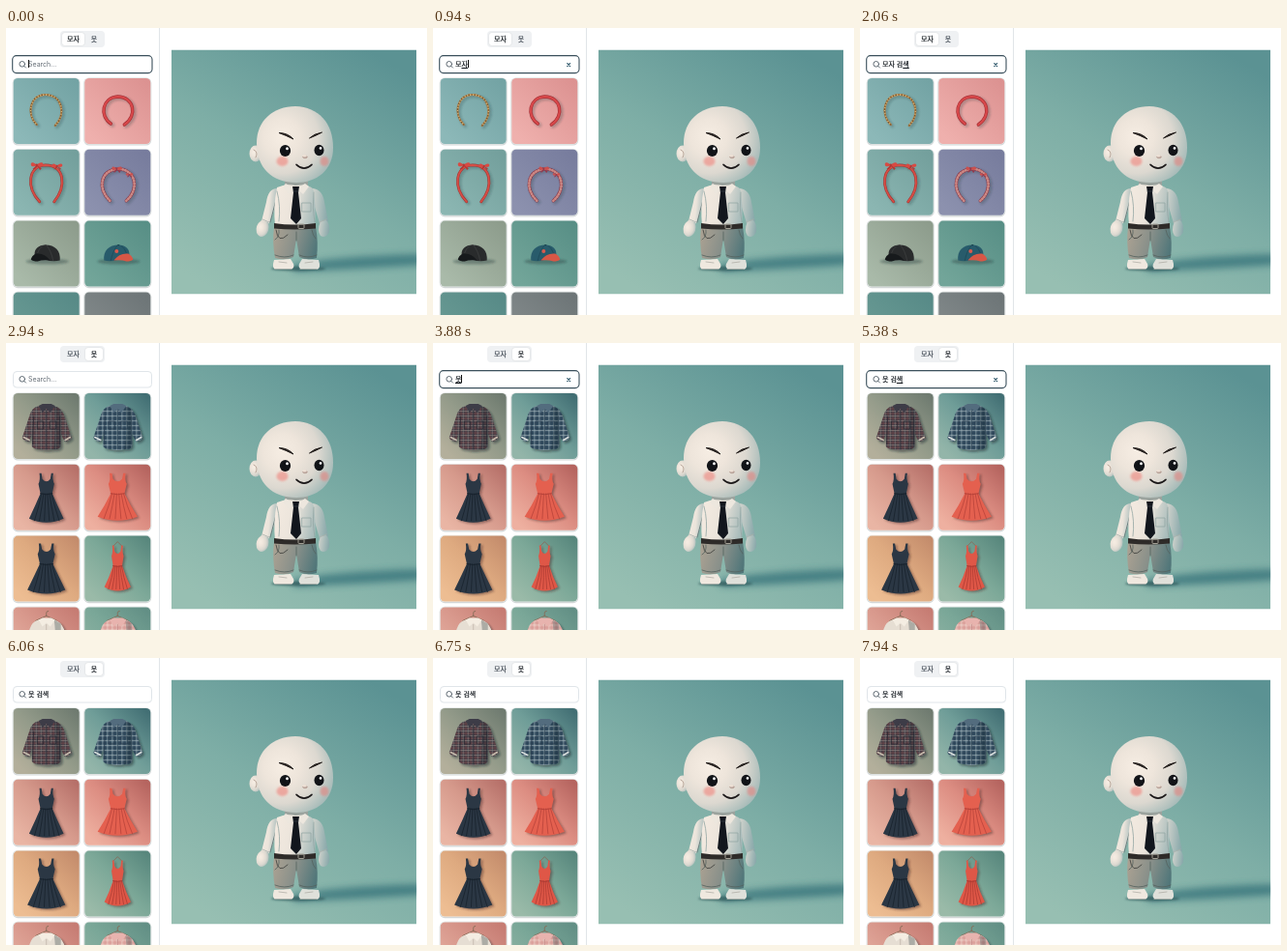
Write an HTML page that moves like this. It is 435x297 px and loops after 8000 ms.

```html
<!DOCTYPE html>
<html lang="ko">
<head>
<meta charset="utf-8">
<title>Wardrobe search</title>
<style>
html, body { margin: 0; width: 100%; height: 100%; overflow: hidden; background: #fff; }
body { position: relative; font: 500 7px/10px "Noto Sans CJK KR", "Noto Sans CJK JP", sans-serif; color: #0c1218; -webkit-text-stroke: .18px; }
svg { position: absolute; left: 0; top: 0; display: block; }
.tabs { position: absolute; left: 56px; top: 3px; width: 46px; height: 17px; border-radius: 4px; background: #eff1f3; }
.tab { position: absolute; top: 2px; height: 13px; line-height: 13px; text-align: center; border-radius: 3px; color: #3d4650; }
.tab.on { background: #fff; color: #0c1218; box-shadow: 0 0 2px #0002; }
#hatTab { left: 2px; width: 23px; }
#topTab { left: 26px; width: 18px; }
.text { position: absolute; left: 23px; top: 32.3px; white-space: pre; }
.text u { text-underline-offset: 1px; text-decoration-thickness: .7px; }
#caret { display: inline-block; position: relative; width: 0; height: 7px; vertical-align: -1px; }
#caret::after { content: ""; position: absolute; left: 0; top: -1px; width: .8px; height: 8px; background: #111; }
#hint { font: 400 7px/10px Inter, sans-serif; color: #646c75; -webkit-text-stroke: 0; }
</style>
</head>
<body>
<svg id="art" width="435" height="297" viewBox="0 0 435 297"></svg>
<div class="tabs"><div class="tab" id="hatTab">모자</div><div class="tab" id="topTab">옷</div></div>
<svg width="158" height="50" fill="none" stroke-linecap="round">
  <rect id="idle" x="7.5" y="29.5" width="143" height="16.5" rx="3.5" stroke="#e0e5e9"/>
  <rect id="active" x="6.7" y="28.6" width="144.3" height="18" rx="4" stroke="#3a4f5b" stroke-width="1.1"/>
  <g stroke="#4c5863" stroke-width=".9"><circle cx="16.7" cy="37.3" r="2.8"/><path d="M18.8 39.4l1.7 1.7"/></g>
  <path id="clear" d="M138.8 36.7l2.8 2.8m0-2.8l-2.8 2.8" stroke="#285266" stroke-width="1.2"/>
</svg>
<div class="text"><span id="done"></span><u id="composing"></u><span id="caret"></span><span id="hint">Search...</span></div>
<script>
const $ = id => document.getElementById(id);

const path = (d, fill, extra = '') => `<path d="${d}" fill="${fill}" ${extra}/>`;
const line = (d, color, w = 1, extra = '') =>
  `<path d="${d}" fill="none" stroke="${color}" stroke-width="${w}" stroke-linecap="round" stroke-linejoin="round" ${extra}/>`;
const oval = (x, y, rx, ry, fill, extra = '') => `<ellipse cx="${x}" cy="${y}" rx="${rx}" ry="${ry}" fill="${fill}" ${extra}/>`;
const soft = 'filter="url(#blur)"';

// Light falls from the lower left, so colours run from lit to shaded
const LIT = 'x1=".1" y1=".9" x2=".95" y2=".05"';
const ACROSS = 'x1="0" y1=".3" x2="1" y2=".5"';
const stops = colors => colors.map((c, i) => `<stop offset="${i / (colors.length - 1)}" stop-color="${c}"/>`).join('');
const linear = (id, colors, way = LIT) => `<linearGradient id="${id}" ${way}>${stops(colors)}</linearGradient>`;
const radial = (id, colors) => `<radialGradient id="${id}" cx=".33" cy=".4" r=".72">${stops(colors)}</radialGradient>`;

function plaid(id, base, a, b) {
  return `<pattern id="${id}" width="5" height="5" patternUnits="userSpaceOnUse">
    <rect width="5" height="5" fill="${base}"/>
    <path d="M1.2 0v5M0 1.2h5" stroke="${a}" stroke-width="1.2" opacity=".7"/>
    <path d="M3.6 0v5M0 3.6h5" stroke="${b}" stroke-width=".6" opacity=".75"/></pattern>`;
}

// Garments and hats, drawn in a 68 px tile
const band = (d, color, shade, w, braid) =>
  line(d, '#24384044', w + 1, `transform="translate(1.8 1.5)" ${soft}`) + line(d, shade, w) + line(d, color, w * .6) +
  (braid ? line(d, braid, w * .7, 'stroke-dasharray=".3 2.6"') : '');

function bow(x, y, size, color, dark) {
  return `<g transform="translate(${x} ${y}) scale(${size})">` +
    path('M0 0C-3-4-7-4-7-1S-4 3 0 0C3-4 8-4 8-1S4 3 0 0', color) +
    path('M0 0L-5 5-2 5 1 1 4 6 6 4Z', dark) + oval(0, 0, 1.4, 1.5, dark) + '</g>';
}

function cap(crown, brim, shade, badge) {
  const flip = badge ? 'transform="translate(68 0) scale(-1 1)"' : '';
  return oval(35, 42, 22, 3, '#263d3c66', soft) + `<g ${flip}>` +
    path('M22 36C21 29 26 25 33 25C43 25 49 31 48 41Q39 43 30 39Z', crown) +
    path('M23 34Q32 33 38 41Q30 40 25 42Q20 42 18 40Q19 36 23 34Z', brim) +
    line('M34 25Q39 31 41 41M30 26Q26 29 25 33', shade, .5) + oval(33, 25, 1.2, .6, shade) + '</g>' +
    (badge ? oval(33, 31.5, 2, 2, badge) : '');
}

function shirt(fill, collar, seam, cuff) {
  const body = 'M26 13Q34 17 42 13L49 17 49 55Q46 59 41 58Q34 60 27 58Q21 58 19 55L20 17Z';
  const arms = 'M26 13Q19 15 17 22Q13 34 9 46Q11 50 16 50Q20 42 22 32ZM42 13Q49 15 52 22Q56 34 60 46Q57 50 53 50Q48 42 47 32Z';
  return path(body + arms, '#1c282a77', `transform="translate(2 2)" ${soft}`) +
    path(arms, fill) + path(body, fill) + path('M42 13L49 17 49 55Q46 59 41 58Q45 35 42 13Z', '#10202a44') +
    line('M21 24Q20 40 20 53M48 24V53M34 18V58M25 29h6v8h-6zM38 29h6v8h-6z', seam, .7) +
    line('M10.5 45.5l6 3M58.5 45.5l-5 3', cuff, 1.6) +
    path('M26 13L30 11H39L43 13 38 20 34 16 30 20Z', collar);
}

function dress(color, fold, w, top, hem) {
  const c = 34, x = d => c + d * w, waist = top + 21;
  const d = `M${x(-7)} ${top}L${x(-5)} ${top} ${x(-4)} ${top + 6}Q${c} ${top + 11} ${x(4)} ${top + 6}L${x(5)} ${top} ${x(7)} ${top}` +
    `Q${x(6)} ${top + 7} ${x(8)} ${top + 11}L${x(6)} ${waist}Q${x(11)} ${waist + 12} ${x(17.5)} ${hem - 4}` +
    `Q${c} ${hem + 4} ${x(-17.5)} ${hem - 4}Q${x(-11)} ${waist + 12} ${x(-6)} ${waist}L${x(-8)} ${top + 11}Q${x(-6)} ${top + 7} ${x(-7)} ${top}Z`;
  const folds = [-12, -7, -2, 3, 8, 13].map(k => `M${x(k * .4)} ${waist}Q${x(k * .6)} ${waist + 12} ${x(k)} ${hem - 2}`).join('');
  return path(d, '#4b302b77', `transform="translate(2 1.5)" ${soft}`) + path(d, color) +
    line(folds, fold, .8) + line(`M${x(-6)} ${waist}Q${c} ${waist + 2} ${x(6)} ${waist}`, fold, 1);
}

const hanger = line('M34 9V6q0-2 2-2M34 9L23 14M34 9L45 14', '#866c58', .9);
const hung = (fill, collar, seam) => hanger + shirt(fill, collar, seam, collar);

const hats = [
  [['#8cb8b8', '#73a3a4'], band('M24 48C13 37 17 17 33 17C50 17 55 37 43 49', '#d8b478', '#a17945', 2.2, '#79562f')],
  [['#efb0ad', '#dc9291'], band('M27 47C15 39 18 20 34 19C51 19 55 39 41 48', '#d9494b', '#a92f35', 3.4)],
  [['#8bb6b2', '#739f9c'], band('M27 54C13 39 15 17 33 16C53 16 55 38 42 54', '#d74f46', '#a43432', 2.8) +
    bow(24, 16, .85, '#d84a43', '#b53532') + bow(45, 17, .7, '#d84a43', '#b53532')],
  [['#8c91ae', '#777c9d'], band('M26 53C13 40 16 22 34 20C53 20 57 41 43 53', '#c76968', '#843e52', 3.4, '#c98c88') +
    bow(33, 20, .7, '#ca504e', '#96374a') + bow(46, 26, .5, '#ca504e', '#96374a')],
  [['#a9baa9', '#8d9c8c'], cap('#292b2c', '#171a1c', '#4a4c4c')],
  [['#72a599', '#588f86'], cap('#285b6b', '#d75746', '#173f4b', '#d95a4d')],
  [['#6b9c95', '#578a87'], ''],
  [['#868d8e', '#6d7577'], '']
];
const tops = [
  [['#b3af9b', '#929a89', '#6f7b70'], shirt('url(#plaidRed)', '#3d3c47', '#23252f', '#c4b9ab')],
  [['#93b5a9', '#6f9d98', '#426f74'], shirt('url(#plaidBlue)', '#536c7e', '#263a4c', '#d5dcda')],
  [['#e9b5a4', '#d69a8c', '#b67069'], dress('#2b3744', '#18222d', 1.02, 9, 60)],
  [['#eeb0a0', '#dc8d82', '#b5645f'], dress('#e4604f', '#b8433a', 1.18, 9, 58)],
  [['#edbd92', '#deaa80', '#c48c6c'], dress('#2b3744', '#18222d', 1.12, 8, 60)],
  [['#9abaa8', '#7ca898', '#58877d'], line('M29 11L34 6 39 11', '#8d5f50', .7) + dress('#df5747', '#ae3b33', .78, 10, 57)],
  [['#e7b4a5', '#d8988c', '#c67c73'], hung('#e6ded3', '#f4ede2', '#bcb1a5')],
  [['#93b5a5', '#7aa798', '#628f85'], hung('url(#plaidPink)', '#e8b3ae', '#bd7b7a')]
];

function grid(id, tiles) {
  return `<g id="${id}">` + tiles.map(([colors, item], i) => {
    const x = i % 2 ? 81.3 : 7.7, y = 52 + (i >> 1) * 73.8, key = id + i;
    return `<g transform="translate(${x} ${y})"><defs>${linear(key, colors)}</defs>
      <rect x="-1" y="-.6" width="70" height="70.2" rx="5.5" fill="#c4cacb" opacity=".75"/>
      <rect x="-.5" y="-.5" width="69" height="69" rx="5" fill="#e9edec"/>
      <rect width="68" height="68" rx="4.5" fill="url(#${key})"/>${item}</g>`;
  }).join('') + '</g>';
}

function figure() {
  const floor = path('M296 245Q340 236 430 234V245Q360 250 298 252Z', '#2f6c75', 'opacity=".7" filter="url(#wide)"') +
    oval(302, 249, 28, 2.5, '#315a5c', `opacity=".75" ${soft}`);
  const arms = path('M280 166Q271 166 269 180L264 200Q267 204 272 202L279 184Z', 'url(#cloth)') +
    path('M317 166Q327 167 329 180L333 200Q329 205 324 202L318 182Z', 'url(#shade)') +
    path('M264 199Q257 204 259 212Q262 218 267 215Q273 211 271 201Z', 'url(#skin)') +
    path('M325 200Q321 210 325 215Q331 218 334 211Q335 203 331 199Z', 'url(#shade)') +
    line('M265 198l7 3M324 201l7-3', '#a9b0ab', .8) + line('M279 178L273 201', '#6b807f', 1);
  const shoe = 'M277 240Q274 249 279 250H293Q299 249 297 244L294 239Z';
  const legs = path(shoe, '#efe8df') + path(shoe, '#dfe0da', 'transform="translate(600 0) scale(-1 1)"') +
    line('M278 249.5H295M304 249.5H321', '#9fa9a4', 1) + line('M282 242l8 1M309 243l8-1', '#aaa79f', .7) +
    path('M277 205H320Q323 223 321 238Q311 241 303 237L300 218 297 237Q288 241 278 238Q275 223 277 205Z', 'url(#pants)') +
    line('M278 235q10 4 19 0M303 235q9 4 18 0M300 211v9M282 209q1 7-4 10M316 209q1 6 4 9', '#55635f', .8) +
    line('M279 209Q281 224 291 214', '#3a3b38', .8);
  const torso = path('M288 154H312V168H288Z', '#9ba39e') +
    path('M280 165Q289 161 299 163Q311 161 317 166Q321 183 319 205H278Q276 184 280 165Z', 'url(#cloth)') +
    line('M306 181h9v9h-9zM280 169q4 15 2 31M318 170q-2 16 1 32', '#93a6a4', .8) +
    path('M289 161L298 166 292 172 286 164ZM309 161L300 166 307 172 313 164Z', '#ede7de') +
    path('M296 164H303L302 170 305 197 300 203 294 197 297 170Z', '#12161d') + line('M297 169h5', '#39414a', .7) +
    path('M277 202Q298 205 320 202V207.5Q298 209.5 277 207.5Z', '#2e2b29') +
    '<rect x="302" y="203" width="6" height="4.5" rx=".7" fill="none" stroke="#a3a095"/>';
  const head = oval(258, 130, 6.5, 8.5, 'url(#skin)') + line('M256 126q5 2 2 8', '#b8a79b', 1) +
    path('M259 119C259 96 276 81 299 81C323 82 338 98 338 124C338 147 321 160 300 160C275 160 259 145 259 119Z', 'url(#skin)') +
    oval(285.5, 138, 6, 5, '#ed9a92', `opacity=".8" ${soft}`) + oval(329, 138, 4.5, 5, '#d9938e', `opacity=".8" ${soft}`) +
    oval(288.5, 127, 5.6, 6, '#111317') + oval(323.5, 126.5, 5, 5.7, '#111317') +
    oval(290.5, 124.8, 1.4, 1.5, '#fff') + oval(325, 124.4, 1.3, 1.4, '#fff') +
    path('M282 108.5Q291 108.5 297 115Q289 111 282 108.5Z', '#241f1d', 'stroke="#241f1d"') +
    path('M313.5 114Q318 109.5 326.5 108Q320 111.5 313.5 114Z', '#241f1d', 'stroke="#241f1d"') +
    oval(309, 133.3, 2.6, 1.9, '#b9a49a') + oval(308.5, 132.3, 2, 1.3, '#eee1d6') +
    line('M300 141.3Q308 149 316 141.3', '#1c191a', 1.6);
  return floor + arms + legs + torso + head;
}

const stage = 'x="171" y="22.5" width="253.2" height="253"';
$('art').innerHTML = `<defs>
  <filter id="blur" x="-30%" y="-50%" width="160%" height="200%"><feGaussianBlur stdDeviation="1.2"/></filter>
  <filter id="wide" x="-20%" y="-80%" width="140%" height="260%"><feGaussianBlur stdDeviation="3.5"/></filter>
  <clipPath id="stage"><rect ${stage}/></clipPath>
  ${linear('wall', ['#97bfb2', '#7eaea6', '#5b9293'], 'x1=".2" y1="1" x2=".8" y2="0"')}
  ${radial('skin', ['#f6ede3', '#eee5db', '#dcd8d0', '#a5bab8'])}
  ${linear('cloth', ['#f3eae0', '#ebe4db', '#a9bcbb'], ACROSS)}
  ${linear('shade', ['#cfd2cc', '#88a8aa'], ACROSS)}
  ${linear('pants', ['#aaa192', '#89908a', '#52777a'], ACROSS)}
  ${plaid('plaidRed', '#35353f', '#78494b', '#b5a9a0')}
  ${plaid('plaidBlue', '#3d596c', '#24394d', '#ccd6d6')}
  ${plaid('plaidPink', '#e3b2ab', '#d59390', '#f4e5da')}
  </defs>
  <rect x="158" width="1" height="297" fill="#e1e5e8"/>
  <g clip-path="url(#stage)"><rect ${stage} fill="url(#wall)"/>${figure()}</g>
  ${grid('hats', hats)}${grid('tops', tops)}`;

// time, committed text, syllable being composed, focused, tab
const steps = [
  [0, '', '', 1, 'hats'],
  [440, '', 'ㅁ', 1, 'hats'], [560, '', '모', 1, 'hats'], [690, '', '몾', 1, 'hats'], [810, '모', '자', 1, 'hats'],
  [1190, '모자 ', '', 1, 'hats'], [1250, '모자 ', 'ㄱ', 1, 'hats'], [1310, '모자 ', '거', 1, 'hats'],
  [1380, '모자 ', '검', 1, 'hats'], [1440, '모자 검', 'ㅅ', 1, 'hats'], [1500, '모자 검', '새', 1, 'hats'],
  [1560, '모자 검', '색', 1, 'hats'], [2500, '모자 검색', '', 0, 'hats'],
  [2880, '', '', 0, 'tops'], [3310, '', '', 1, 'tops'],
  [3500, '', 'ㅇ', 1, 'tops'], [3630, '', '오', 1, 'tops'], [3750, '', '옷', 1, 'tops'],
  [4130, '옷 ', '', 1, 'tops'], [4380, '옷 ', 'ㄱ', 1, 'tops'], [4500, '옷 ', '거', 1, 'tops'],
  [4630, '옷 ', '검', 1, 'tops'], [4690, '옷 검', 'ㅅ', 1, 'tops'], [4750, '옷 검', '새', 1, 'tops'],
  [4820, '옷 검', '색', 1, 'tops'], [5940, '옷 검색', '', 0, 'tops']
];
const LOOP = 8000, BLINK = 500;
const show = (id, on) => { $(id).style.visibility = on ? 'visible' : 'hidden'; };

let shown;
function draw(t) {
  const step = steps.findLast(s => s[0] <= t);
  const [start, done, composing, focused, tab] = step;
  show('caret', focused && Math.floor((t - start) / BLINK) % 2 === 0);
  if (step === shown) return;
  shown = step;
  const filled = done + composing !== '';
  $('done').textContent = done;
  $('composing').textContent = composing;
  show('hint', !filled);
  show('clear', filled && focused);
  show('active', focused);
  show('idle', !focused);
  show('hats', tab === 'hats');
  show('tops', tab === 'tops');
  $('hatTab').classList.toggle('on', tab === 'hats');
  $('topTab').classList.toggle('on', tab === 'tops');
}

const origin = performance.now();
function tick() {
  draw((performance.now() - origin) % LOOP);
  requestAnimationFrame(tick);
}
tick();
</script>
</body>
</html>
```
